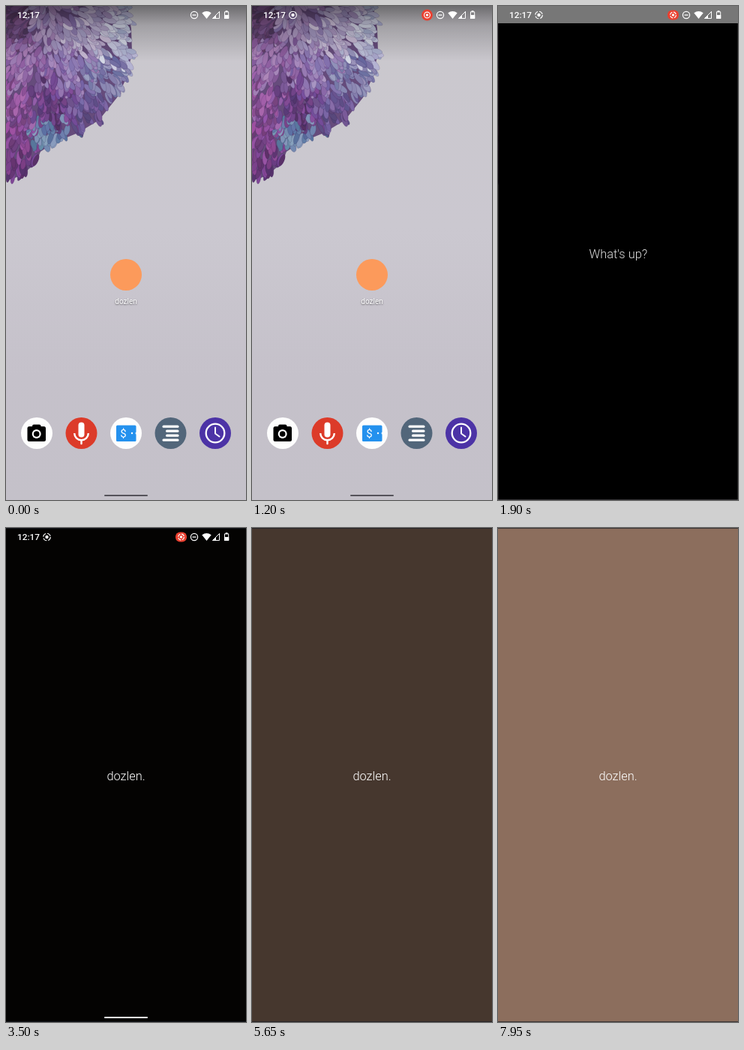
An HTML page with a canvas that plays this animation: 320 by 658 pixels, repeating every 8000 ms.

```html
<!DOCTYPE html>
<html lang="en">
<head>
<meta charset="utf-8">
<title>Wake light</title>
<style>
html, body { margin: 0; width: 100%; height: 100%; overflow: hidden; background: #000; }
canvas { display: block; width: 320px; height: 658px; }
</style>
</head>
<body>
<canvas id="stage" width="320" height="658"></canvas>
<script>
const W = 320, H = 658, LOOP = 8000, APP = 'dozlen';
const FONT = 'Roboto, "Open Sans", sans-serif';
const stage = document.getElementById('stage');
let g = stage.getContext('2d');

const ramp = (t, a, b) => Math.min(1, Math.max(0, (t - a) / (b - a)));
const mix = (a, b, k) => a + (b - a) * k;

function rect(x, y, w, h, r, color) {
  g.fillStyle = color;
  g.beginPath();
  g.roundRect(x, y, w, h, r);
  g.fill();
}
function disc(x, y, r, color) {
  g.fillStyle = color;
  g.beginPath();
  g.arc(x, y, r, 0, 7);
  g.fill();
}
function ring(x, y, r, width, color, dash = []) {
  g.strokeStyle = color;
  g.lineWidth = width;
  g.setLineDash(dash);
  g.beginPath();
  g.arc(x, y, r, 0, Math.PI * 2);
  g.stroke();
  g.setLineDash([]);
}
function line(width, color, ...pts) {
  g.strokeStyle = color;
  g.lineWidth = width;
  g.lineCap = g.lineJoin = 'round';
  g.beginPath();
  pts.forEach(([x, y]) => g.lineTo(x, y));
  g.stroke();
  g.lineCap = 'butt';
}
function poly(color, ...pts) {
  g.fillStyle = color;
  g.beginPath();
  pts.forEach(([x, y]) => g.lineTo(x, y));
  g.fill();
}
function label(str, x, y, font, color = '#fff', align = 'center') {
  g.font = font + ' ' + FONT;
  g.textAlign = align;
  g.fillStyle = color;
  g.fillText(str, x, y);
}
function fade(alpha, draw) {
  if (alpha <= 0) return;
  g.save();
  g.globalAlpha = alpha;
  draw();
  g.restore();
}

// Colour areas of the flower: x, y, hue, saturation, lightness
const tones = [
  [10, 18, 285, 24, 38], [60, 15, 270, 24, 60], [108, 30, 262, 24, 72],
  [152, 45, 235, 26, 78], [28, 75, 280, 26, 54], [85, 85, 266, 27, 60],
  [132, 98, 242, 22, 60], [70, 132, 277, 33, 38], [112, 138, 262, 26, 46],
  [10, 130, 288, 30, 46], [10, 180, 288, 33, 42], [25, 215, 284, 36, 38],
  [62, 178, 215, 28, 56]
];
const edge = 'M-9 -9H160L167 30L168 62L161 95L148 122L124 152L96 169L64 182' +
  'L46 194L40 209L20 226L6 231L-9 232Z';

function paintFlower() {
  let seed = 11;
  const rnd = () => (seed = seed * 16807 % 2147483647) / 2147483647;
  const jitter = n => (rnd() - .5) * n;
  const shape = new Path2D(edge), petals = [];
  while (petals.length < 800) {
    const x = rnd() * 184 - 9, y = rnd() * 242 - 9;
    if (g.isPointInPath(shape, x, y)) petals.push([x, y, Math.hypot(x - 55, y)]);
  }
  petals.sort((a, b) => b[2] - a[2]);
  g.fillStyle = '#664c7c';
  g.fill(shape);
  g.strokeStyle = 'rgba(45,25,75,.22)';
  g.lineWidth = .7;
  for (const [x, y] of petals) {
    const px = x + jitter(22), py = y + jitter(22);
    const gap = ([a, b]) => Math.hypot(a - px, b - py);
    const [, , h, s, l] = tones.reduce((a, b) => gap(b) < gap(a) ? b : a);
    g.fillStyle = `hsl(${h + jitter(20)} ${s}% ${l + jitter(18)}%)`;
    g.beginPath();
    g.ellipse(x, y, 7 + rnd() * 3, 2.8 + rnd() * 1.4,
      Math.atan2(y + 10, x - 55) + jitter(.9), 0, 7);
    g.fill();
    g.stroke();
  }
}

function makeWallpaper() {
  const sheet = document.createElement('canvas');
  sheet.width = W;
  sheet.height = H;
  const main = g;
  g = sheet.getContext('2d');
  const sky = g.createLinearGradient(0, 0, 0, H);
  sky.addColorStop(0, '#cac8cd');
  sky.addColorStop(.45, '#cbc8d0');
  sky.addColorStop(.75, '#c5c1ca');
  sky.addColorStop(1, '#c4c1c9');
  rect(0, 0, W, H, 0, sky);
  paintFlower();
  g = main;
  return sheet;
}
const wallpaper = makeWallpaper();

function drawWallpaper(p) {
  const z = 1 + .016 * p;
  g.drawImage(wallpaper, 0, 0, W * z, H * z);
  const scrim = g.createLinearGradient(0, 0, 0, 74);
  scrim.addColorStop(0, 'rgba(0,0,0,.46)');
  scrim.addColorStop(.35, 'rgba(0,0,0,.2)');
  scrim.addColorStop(1, 'rgba(0,0,0,0)');
  rect(0, 0, W, 74, 0, scrim);
}

function drawLauncher() {
  const y = 569;
  disc(160, 358, 21, '#fc9a5b');
  g.save();
  g.shadowColor = 'rgba(0,0,0,.55)';
  g.shadowBlur = 2;
  g.shadowOffsetY = 1;
  label(APP, 160, 397, '10px');
  g.restore();

  ['#fdfdfd', '#dc3b29', '#fdfdfd', '#52667a', '#4c33a6']
    .forEach((c, i) => disc(41 + i * 59.5, y, 21, c));

  // camera
  rect(28.5, 560, 24.5, 20, 2.5, '#000');
  rect(35, 557.5, 11.5, 6, 2, '#000');
  disc(40.7, 570, 6, '#fff');
  disc(40.7, 570, 3.8, '#000');

  // microphone
  rect(96.5, 554.5, 8, 20, 4, '#fff');
  g.strokeStyle = '#fff';
  g.lineWidth = 2.4;
  g.beginPath();
  g.arc(100.5, y, 9.3, 0, Math.PI);
  g.stroke();
  line(2.4, '#fff', [100.5, 579], [100.5, 583]);

  // wallet
  rect(147, 558.5, 26.5, 21.5, 1.5, '#2491ee');
  disc(174, y, 1.5, '#fdfdfd');
  disc(168, y, 1.2, '#fff');
  label('$', 156.5, 574.3, '15px');

  // list
  [208.5, 213, 213, 208.5].forEach((x, i) =>
    rect(x, 558.5 + i * 6, 230.5 - x, 3.2, 1.5, '#fff'));

  // clock
  ring(279, y, 12.3, 2.3, '#fff');
  line(2, '#fff', [279, 561.5], [279, 569.5], [284.5, 573.5]);
  rect(131, 651, 58, 2, 1, '#55535a');
}

function drawStatus(t) {
  const white = '#fff', dashed = t > 1250;
  label('12:17', 15, 16.2, '500 11.8px', white, 'left');
  fade(ramp(t, 100, 450), () => {
    ring(54.5, 12, 4.8, 1.1, white, dashed ? [5.5, 2.04] : []);
    disc(54.5, 12, 2.2, white);
    if (dashed) rect(226, 5.5, 15, 13, 6, '#ea4030');
    else disc(233.5, 12, 7.4, '#ea4030');
    ring(233.5, 12, 3.9, 1.1, white, dashed ? [4.6, 1.53] : []);
    disc(233.5, 12, 1.7, white);
  });
  ring(251, 12, 4.6, 1.2, white);
  rect(248.5, 11.4, 5, 1.3, 0, white);

  // wifi, signal, battery
  g.fillStyle = white;
  g.beginPath();
  g.moveTo(267.5, 17);
  g.lineTo(261.3, 9.3);
  g.quadraticCurveTo(267.5, 4.6, 273.7, 9.3);
  g.fill();
  line(1, white, [284.5, 7.5], [284.5, 16.5], [275.5, 16.5], [284.5, 7.5]);
  poly(white, [280, 12], [280, 17], [275, 17]);
  rect(292.7, 6.2, 2.8, 2, 0, white);
  g.strokeStyle = white;
  g.lineWidth = 1;
  g.strokeRect(291.5, 7.8, 5.2, 8.7);
  rect(291, 12, 6.2, 5, .5, white);
}

function drawApp(t, p) {
  const x = mix(131, 0, p), top = mix(356, 0, p), bottom = mix(356, H, p);
  fade(ramp(t, 1300, 1380), () => {
    const glow = ramp(t, 3383, 7950);
    const color = `rgb(${[140, 110, 93].map(c => Math.round(c * glow)).join()})`;
    rect(x, top, W - 2 * x, bottom - top, Math.min(21, 108 * (1 - p)), color);
    if (glow) {
      rect(0, 0, W, 1, 0, 'rgba(24,28,36,.65)');
      rect(0, H - 1, W, 1, 0, 'rgba(24,28,36,.65)');
    }
  });

  const hello = ramp(t, 1400, 1500) * (1 - ramp(t, 1840, 2350));
  fade(hello, () => {
    g.translate(160.3, mix(359, 330, p));
    g.scale(.7 + .3 * p, .7 + .3 * p);
    label("What's up?", 0, 5.6, '300 16.4px');
  });
  fade(ramp(t, 2350, 2900), () => label(APP + '.', 160, 335.6, '300 16.4px'));
}

function draw(t) {
  const p = 1 - (1 - ramp(t, 1300, 1970)) ** 3;
  g.clearRect(0, 0, W, H);
  if (p < 1) {
    drawWallpaper(p);
    fade(1 - ramp(t, 1280, 1450), drawLauncher);
  }
  if (t >= 1300) drawApp(t, p);
  fade(ramp(t, 1780, 1880) * (1 - ramp(t, 1920, 2000)),
    () => rect(0, 0, W, 23, 0, '#777'));
  const bars = 1 - ramp(t, 3520, 3820);
  fade(bars, () => drawStatus(t));
  fade(bars * ramp(t, 2000, 2150), () => rect(131, 651, 58, 2, 1, '#fff'));
}

function tick(now) {
  draw(now % LOOP);
  requestAnimationFrame(tick);
}
draw(0);
requestAnimationFrame(tick);
</script>
</body>
</html>
```
